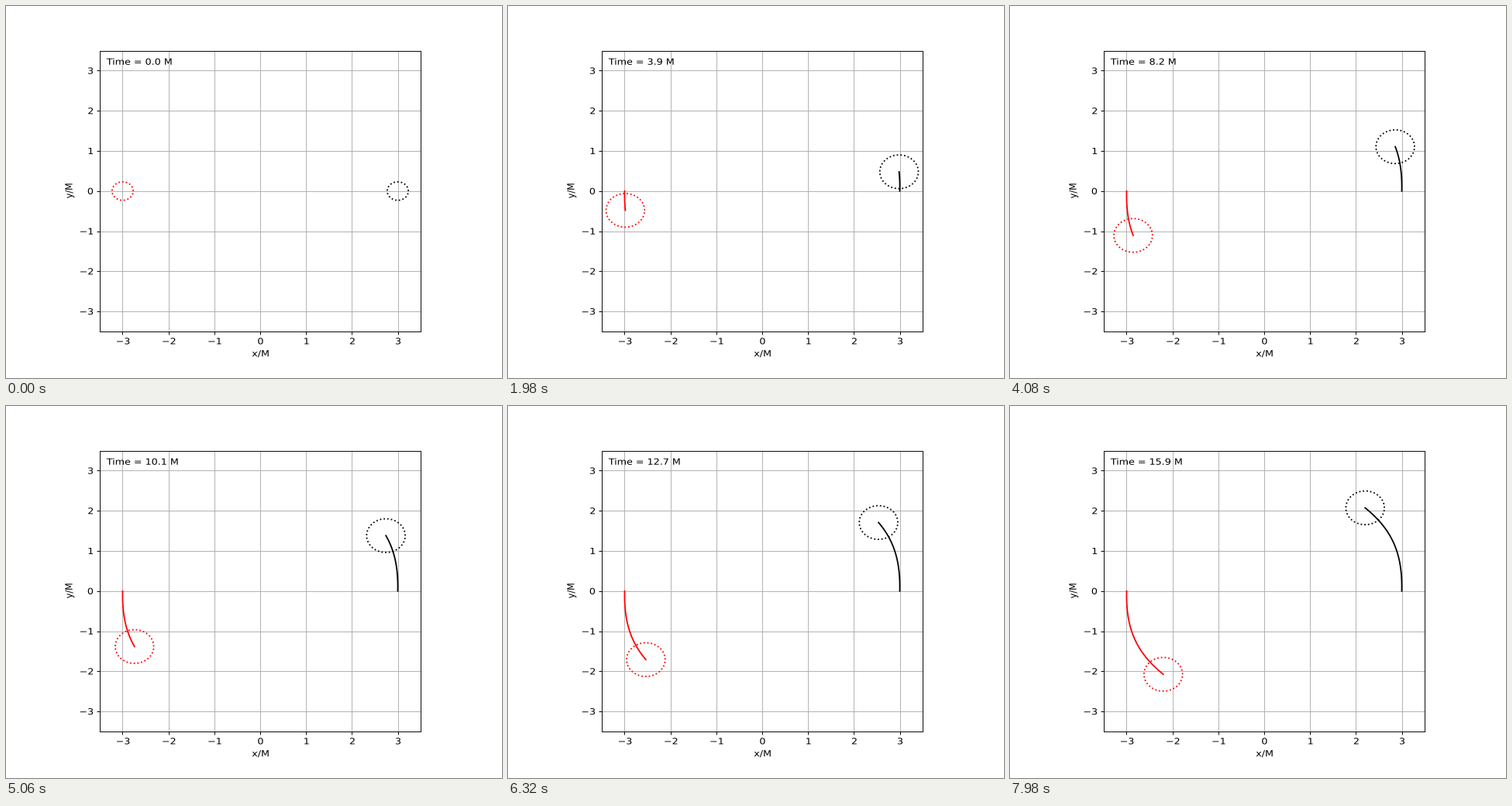
A matplotlib script for the animation above (8 s loop, 640 by 480 pixels).

```python
import numpy as np
import matplotlib.pyplot as plt
from matplotlib.animation import FuncAnimation
from matplotlib.patches import PathPatch
from matplotlib.textpath import TextPath
from matplotlib.transforms import Affine2D

plt.rcParams["font.family"] = "DejaVu Sans"

W, H, DPI = 640, 480, 100
TICK_MS, TICKS = 20, 400

# A 7 x 6 inch page shown on a 4:3 stage: everything is squashed alike.
SX, SY = W / 700, H / 600
PEN = (SX + SY) / 2
EM = 10 * DPI / 72

DT = 3 / 32          # simulated time per step
OMEGA = 0.0497       # orbital rate once settled
SPIN_UP = 0.73

fig = plt.figure(figsize=(W / DPI, H / DPI), dpi=DPI, facecolor="white")
side = 0.755
width = side * 6 / 7
ax = fig.add_axes([0.5125 - width / 2, 0.125, width, side])
ax.set_xlim(-3.5, 3.5)
ax.set_ylim(-3.5, 3.5)
marks = np.arange(-3, 4)
ax.set_xticks(marks)
ax.set_yticks(marks)
ax.grid(True, color="#b0b0b0", lw=0.8 * PEN)
ax.tick_params(width=0.8 * PEN, labelbottom=False, labelleft=False)
ax.tick_params(axis="x", length=3.5 * SY)
ax.tick_params(axis="y", length=3.5 * SX)
for spine in ax.spines.values():
    spine.set_linewidth(0.8 * PEN)


def text_path(text):
    return TextPath((0, 0), text, size=EM)


def label(text, x, y, align=0.0, angle=0):
    """Text with its baseline at stage pixel (x, y), y counted downwards."""
    path = text_path(text)
    shift = -align * path.get_extents().x1
    place = (Affine2D().translate(shift, 0).rotate_deg(angle)
             .scale(SX, SY).translate(x, H - y))
    patch = PathPatch(path, fc="black", lw=0, transform=place)
    fig.add_artist(patch)
    return patch


def to_stage(x, y):
    px, py = ax.transData.transform((x, y))
    return px, H - py


for n in marks:
    name = str(n).replace("-", "\u2212")
    px, py = to_stage(n, n)
    label(name, px, 436.4, 0.5)
    label(name, 112.1, py + 4.1, 1)

mid_x, mid_y = to_stage(0, 0)
label("x/M", mid_x, 452.2, 0.5)
label("y/M", 85.6, mid_y, 0.5, 90)
clock = label("Time = 0.0 M", *to_stage(-3.35, 3.15))


def step_at(tick):
    """Steps come in threes: one held for five ticks, then two quick ones."""
    if tick == 0:
        return 0
    group, rest = divmod(tick - 1, 7)
    return 3 * group + max(0, rest - 4)


def orbit(t):
    angle = OMEGA * (t - SPIN_UP * (1 - np.exp(-t / SPIN_UP)))
    radius = 3 + 0.07 * np.sin(np.pi * t / 20) ** 2
    return radius * np.cos(angle), radius * np.sin(angle)


def horizon(t):
    return 0.23 + 0.19 * (1 - np.exp(-t * t))


turn = np.linspace(0, 2 * np.pi, 121)
bodies = []
for sign, color in ((1, "black"), (-1, "red")):
    trail, = ax.plot([], [], color=color, lw=1.5 * PEN)
    ring, = ax.plot([], [], color=color, lw=1.5 * PEN, ls=":")
    bodies.append((sign, trail, ring))


def draw(tick):
    times = DT * np.arange(step_at(tick) + 1)
    now = times[-1]
    x, y = orbit(times)
    r = horizon(now)
    for sign, trail, ring in bodies:
        trail.set_data(sign * x, sign * y)
        ring.set_data(sign * x[-1] + r * np.cos(turn),
                      sign * y[-1] + r * np.sin(turn))
    clock.set_path(text_path(f"Time = {now:.1f} M"))
    return []


anim = FuncAnimation(fig, draw, frames=TICKS, interval=TICK_MS,
                     init_func=lambda: draw(0), repeat=True, repeat_delay=0)
plt.show()
```
